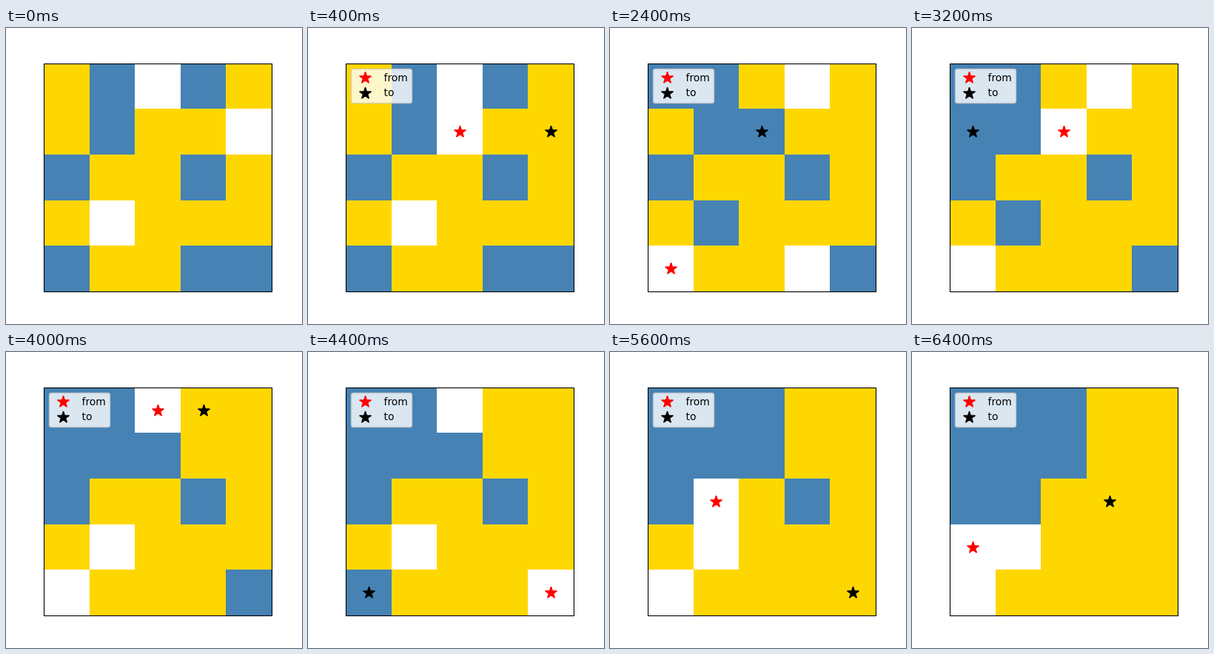
An HTML page that plays this animation: 400x400 px, repeating every 6.8 s.

```html
<!DOCTYPE html>
<html lang="en">
<head>
<meta charset="utf-8">
<title>Segregation model</title>
<style>
  html, body { margin: 0; width: 100%; height: 100%; overflow: hidden; background: #fff; }
  svg { display: block; width: 100%; height: 100%; }
  text { font: 13.89px "DejaVu Sans", sans-serif; }
  .from { fill: red; stroke: red; }
  .to { fill: black; stroke: black; }
</style>
</head>
<body>
<svg viewBox="0 0 400 400">
  <defs>
    <path id="star" stroke-width="1.39" stroke-linejoin="bevel"/>
  </defs>
  <g id="cells" shape-rendering="crispEdges"></g>
  <g id="marks">
    <use id="from" class="from" href="#star"/>
    <use id="to" class="to" href="#star"/>
  </g>
  <rect x="51.5" y="48.5" width="308" height="308" fill="none" stroke="black" stroke-width="1.11"/>
  <g id="legend">
    <rect x="58.5" y="55.5" width="82" height="46" rx="2.78" fill="#fff" stroke="#ccc" stroke-width="1.39"
          fill-opacity=".8" stroke-opacity=".8"/>
    <use class="from" href="#star" x="77.5" y="67.5"/>
    <use class="to" href="#star" x="77.5" y="88.5"/>
    <text x="102.5" y="72">from</text>
    <text x="102.5" y="92">to</text>
  </g>
</svg>
<script>
const SIZE = 5, CELL = 61.6, LEFT = 51, TOP = 48, STEP_MS = 400;
const COLORS = { Y: '#ffd700', B: '#4682b4', W: '#fff' };
const START = 'YBWBY' + 'YBYYW' + 'BYYBY' + 'YWYYY' + 'BYYBB';
// Each move takes an agent from one cell to an empty one (row * SIZE + column).
const MOVES = [
  [7, 9], [20, 16], [0, 2], [23, 20], [3, 0], [20, 7], [5, 23], [7, 5],
  [16, 7], [2, 3], [24, 20], [20, 16], [16, 2], [11, 24], [13, 11], [15, 13]
];

const byId = id => document.getElementById(id);
const column = i => i % SIZE;
const row = i => Math.floor(i / SIZE);
const edgeX = c => Math.round(LEFT + c * CELL);
const edgeY = r => Math.round(TOP - 0.2 + r * CELL);

function setAttributes(element, attributes) {
  for (const [name, value] of Object.entries(attributes)) element.setAttribute(name, value);
}

function starPath(radius) {
  const points = Array.from({ length: 10 }, (_, i) => {
    const r = i % 2 ? radius * 0.381966 : radius;
    const angle = i * Math.PI / 5;
    return `${r * Math.sin(angle)},${-r * Math.cos(angle)}`;
  });
  return `M${points.join('L')}Z`;
}

function placeStar(id, cell) {
  setAttributes(byId(id), {
    x: Math.round(LEFT + (column(cell) + 0.5) * CELL) + 0.5,
    y: Math.round(TOP + (row(cell) + 0.5) * CELL) + 0.5
  });
}

function gridAfter(count) {
  const grid = [...START];
  for (const [from, to] of MOVES.slice(0, count)) {
    grid[to] = grid[from];
    grid[from] = 'W';
  }
  return grid;
}

byId('star').setAttribute('d', starPath(8.33));

const cells = [...START].map((_, i) => {
  const rect = document.createElementNS('http://www.w3.org/2000/svg', 'rect');
  const c = column(i), r = row(i), x = edgeX(c), y = edgeY(r);
  setAttributes(rect, { x, y, width: edgeX(c + 1) - x, height: edgeY(r + 1) - y });
  return byId('cells').appendChild(rect);
});

function draw(step) {
  const grid = gridAfter(step);
  cells.forEach((rect, i) => rect.setAttribute('fill', COLORS[grid[i]]));
  for (const id of ['marks', 'legend']) byId(id).style.display = step ? '' : 'none';
  if (step) {
    const [from, to] = MOVES[step - 1];
    placeStar('from', from);
    placeStar('to', to);
  }
}

let shown = -1;
function tick() {
  const step = Math.floor(performance.now() / STEP_MS) % (MOVES.length + 1);
  if (step !== shown) draw(shown = step);
  requestAnimationFrame(tick);
}
tick();
</script>
</body>
</html>
```
